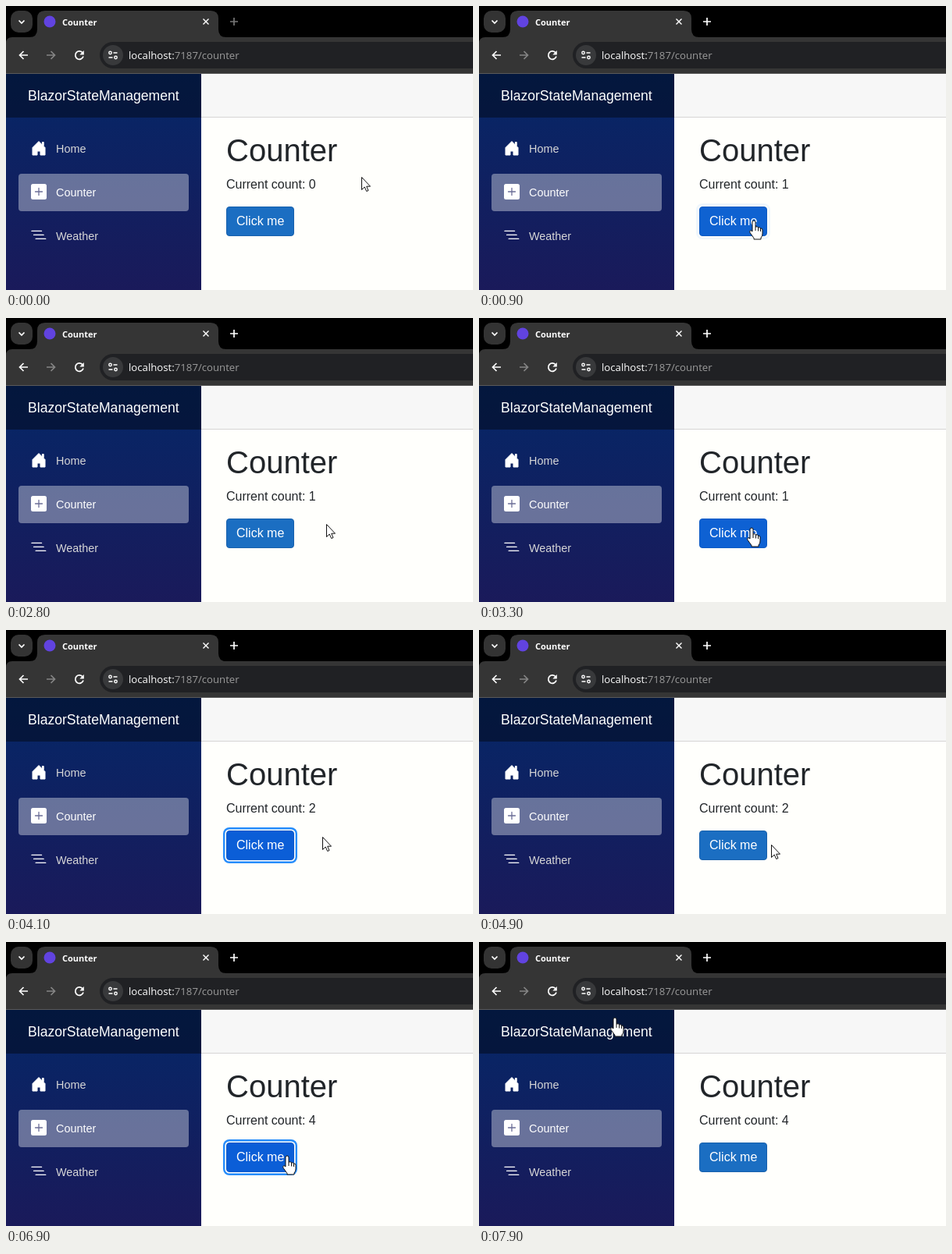
An HTML page for the animation above (8 s loop, 598 by 364 pixels).

```html
<!DOCTYPE html>
<html lang="en">
<head>
<meta charset="utf-8">
<title>Counter</title>
<style>
  html, body { margin: 0; width: 100%; height: 100%; overflow: hidden; background: #fffffc; }
  svg { display: block; }
  text { font-family: "Liberation Sans", Arial, sans-serif; white-space: pre; }
  .chrome { font-family: "Open Sans", "Noto Sans", sans-serif; }
  .nav { font-size: 14.4px; fill: #d7d7d7; }
  .nav.active { fill: #fff; }
  .line { fill: none; stroke: #fff; stroke-width: 1.7; }
  .thin { stroke-width: 1.4; }
  .pointer { fill: #fff; stroke: #111; }
</style>
</head>
<body>
<svg width="598" height="364" viewBox="0 0 598 364">
  <defs>
    <linearGradient id="side" gradientUnits="userSpaceOnUse" x1="0" y1="87" x2="0" y2="787">
      <stop stop-color="#052767"/><stop offset="1" stop-color="#3a0647"/>
    </linearGradient>
  </defs>

  <!-- tab strip -->
  <rect width="598" height="50" fill="#000"/>
  <rect x="6" y="6" width="28" height="28" rx="10" fill="#333"/>
  <path class="line" d="M16.500 18.500l3.500 3.500 3.500-3.500"/>
  <path d="M30 40q10 0 10-10V16q0-10 10-10H262q10 0 10 10V30q0 10 10 10Z" fill="#353535"/>
  <circle cx="56" cy="20" r="7.500" fill="#6143e0"/>
  <text class="chrome" x="72" y="24.500" font-size="11" font-weight="700" fill="#fff">Counter</text>
  <path class="line thin" d="M252.500 16.500l7 7m0-7l-7 7"/>
  <path class="line" id="plus" d="M287 20h10M292 15v10"/>

  <!-- toolbar -->
  <path d="M0 87V48q0-8 8-8H598V87Z" fill="#353535"/>
  <path d="M0 86.500H598" stroke="#5a5a5a"/>
  <rect x="120" y="46" width="520" height="34" rx="17" fill="#202124"/>
  <circle cx="137" cy="63" r="13" fill="#38393b"/>
  <path class="line" d="M28 63H17.500m5-5l-5 5 5 5"/>
  <path class="line" d="M52 63h10.500m-5-5l5 5-5 5" style="stroke:#858585"/>
  <path class="line" d="M98.200 60A5.200 5.200 0 1 0 99 64.500"/>
  <path d="M99.800 57v5.500h-5.500Z" fill="#fff"/>
  <g class="line thin">
    <path d="M137.500 60h5M131.500 66h5"/>
    <circle cx="133.500" cy="60" r="1.700"/><circle cx="140.500" cy="66" r="1.700"/>
  </g>
  <text class="chrome" x="157" y="68" font-size="13.200" fill="#fff">localhost:<tspan fill="#9b9b9b">7187/counter</tspan></text>

  <!-- sidebar -->
  <rect y="87" width="250" height="277" fill="url(#side)"/>
  <rect y="87" width="250" height="56" fill="#000" fill-opacity=".4"/>
  <text x="28" y="121" font-size="17.600" fill="#fff">BlazorStateManagement</text>
  <rect x="16" y="215" width="218" height="48" rx="4" fill="#fff" fill-opacity=".37"/>
  <g fill="#fff">
    <path d="M34 191V181.500L42 173.500 46.400 178V174.500H48.200V179.700L50 181.500V191H44V186H40V191Z" stroke="#fff" stroke-linejoin="round"/>
    <rect x="32" y="228" width="20" height="20" rx="2.500"/>
  </g>
  <path d="M37.500 238h9M42 233.500v9" stroke="#6b6d97" stroke-width="1.300" stroke-linecap="round"/>
  <path class="line thin" d="M33 288.400h12.500M35.600 293.400h12.500M38.200 298.400h12.500" stroke-linecap="round"/>
  <text class="nav" x="64" y="188">Home</text>
  <text class="nav active" x="64" y="244">Counter</text>
  <text class="nav" x="64" y="300">Weather</text>

  <!-- page -->
  <rect x="250" y="87" width="348" height="56" fill="#f7f7f7"/>
  <path d="M250 142.500h348" stroke="#d6d5d5"/>
  <text x="282" y="199" font-size="40" fill="#212529">Counter</text>
  <text id="count" x="282" y="234" font-size="16" fill="#212529"></text>
  <g id="ring">
    <rect x="278" y="253" width="95" height="46" rx="8" fill="#258cfb"/>
    <rect x="280.400" y="255.400" width="90.200" height="41.200" rx="5.600" fill="#fff"/>
  </g>
  <rect id="button" x="282.500" y="257.500" width="86" height="37" rx="3.500"/>
  <text x="295" y="281" font-size="16" fill="#fff">Click me</text>

  <!-- pointers, tip at 0,0 -->
  <path id="arrow" class="pointer" d="M.5.5V16.500L4.200 13 6.700 18.500 9 17.500 6.700 12.200H11.500Z"/>
  <g id="hand" class="pointer">
    <path d="M-2 13V1a2 2 0 0 1 4 0V7q3-1 3.500 1 2.500-1 3 1 2.500-.5 2.500 2v5q0 3-2 5v2H0v-1.500l-5-7q-1-2.500 1-3Z"/>
    <path d="M2 7v5M5.500 8v4.500M8.500 9v4"/>
  </g>
</svg>
<script>
const LOOP = 8000, STEP = 100, FADE = 150, MOVE = 400;

// Where the pointer arrives and when; it clicks on every arrival.
const stops = [
  { at: 0, x: 455, y: 219 },
  { at: 900, x: 352, y: 276 },
  { at: 2215, x: 465, y: 271 },
  { at: 2750, x: 410, y: 264 },
  { at: 3350, x: 346, y: 270 },
  { at: 4293, x: 458, y: 261 },
  { at: 5000, x: 358, y: 278 },
  { at: 5500, x: 452, y: 269 },
  { at: 6700, x: 360, y: 275 },
  { at: 7400, x: 437, y: 268 },
  { at: 7900, x: 174, y: 98 }
];
const $ = id => document.getElementById(id);
const clamp = v => Math.min(1, Math.max(0, v));
const ease = k => k * k * (3 - 2 * k);
const mix = (a, b, k) => a + (b - a) * k;

const within = (p, x, y, w, h) => p.x >= x && p.x <= x + w && p.y >= y && p.y <= y + h;
const onButton = p => within(p, 282, 257, 87, 38);
const onBrand = p => within(p, 28, 98, 194, 33);

function pointer(t) {
  let { x, y } = stops[0];
  for (const s of stops) {
    const k = ease(clamp((t - s.at) / MOVE + 1));
    x = mix(x, s.x, k);
    y = mix(y, s.y, k);
  }
  return { x, y };
}

const visited = t => stops.filter(s => s.at <= t);
const clicks = t => visited(t).filter(onButton).length;
const focused = t => t >= 0 && onButton(visited(t).pop());
const hot = t => focused(t) || onButton(pointer(t));

// share of the last FADE ms during which a state held
function fade(state, t) {
  const samples = 15;
  let sum = 0;
  for (let i = 0; i < samples; i++) sum += state(t - i * FADE / samples);
  return sum / samples;
}
const blend = (a, b, k) => `rgb(${a.map((v, i) => mix(v, b[i], k))})`;

function draw(t) {
  const p = pointer(t), h = fade(hot, t);
  const shown = onButton(p) || onBrand(p) ? "hand" : "arrow";
  for (const id of ["arrow", "hand"]) {
    $(id).setAttribute("transform", `translate(${Math.round(p.x)} ${Math.round(p.y)})`);
    $(id).style.display = id === shown ? "" : "none";
  }
  $("count").textContent = "Current count: " + clicks(t);
  $("ring").style.opacity = fade(focused, t);
  $("button").style.fill = blend([27, 110, 194], [11, 94, 215], h);
  $("button").style.stroke = blend([24, 97, 172], [10, 88, 202], h);
  $("plus").style.stroke = clicks(t) ? "#fff" : "#777";
}

const start = performance.now();
function tick() {
  const t = (performance.now() - start) % LOOP;
  draw(Math.floor(t / STEP) * STEP);
  requestAnimationFrame(tick);
}
tick();
</script>
</body>
</html>
```
